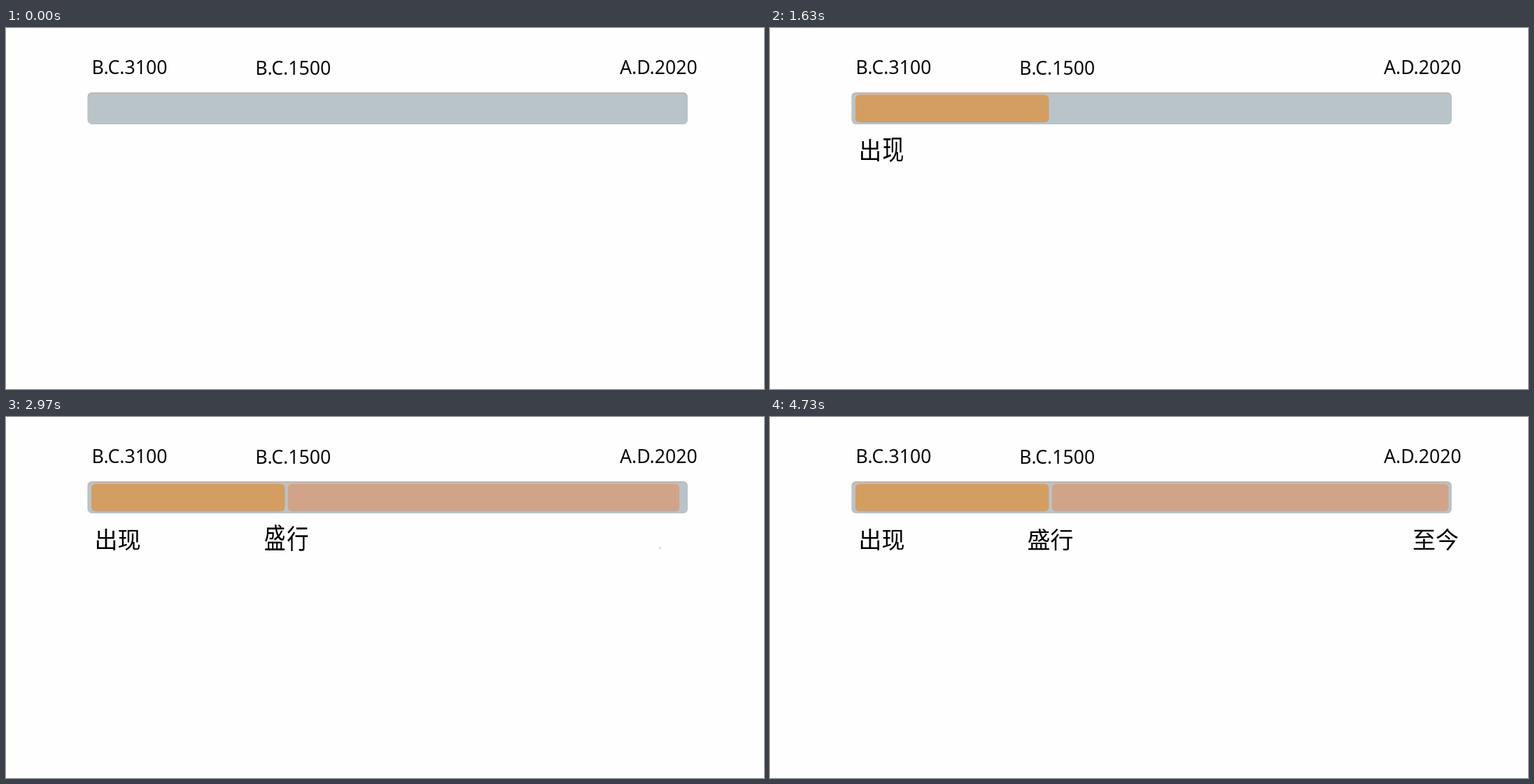
These frames come from a looping animation (1083x517 px, 5.01 s). An HTML page:

```html
<!DOCTYPE html>
<html lang="zh-CN">
<head>
<meta charset="utf-8">
<style>
html, body { margin: 0; width: 100%; height: 100%; overflow: hidden; background: #fefefe; }
svg { display: block; width: 1083px; height: 517px; }
.year { font: 26.7px "Noto Sans", "Open Sans", sans-serif; fill: #0a0a0a; }
.word { font: 33px "Noto Sans CJK SC", "Noto Sans CJK", sans-serif; text-anchor: middle; }
</style>
</head>
<body>
<svg viewBox="0 0 1083 517">
  <text class="year" x="122.5" y="66">B.C.3100</text>
  <text class="year" x="356.3" y="67">B.C.1500</text>
  <text class="year" x="877" y="66">A.D.2020</text>
  <rect x="116.5" y="92.3" width="857.3" height="45" rx="6" fill="#c2ada3"/>
  <rect x="117" y="94" width="857" height="44" rx="6" fill="#b9c4c9"/>
  <g id="stage"></g>
</svg>
<script>
const LOOP = 5010;
const stage = document.getElementById('stage');
const clamp = v => Math.min(1, Math.max(0, v));

// Bars ease in slowly, then rush to full width.
const grow = age => Math.sin(Math.PI / 2 * clamp(age / 1350) ** 2) ** 2;

// Characters grow steadily, lag in height, then overshoot and settle.
function stretch(age) {
  const size = clamp(age / 1120);
  const swing = 0.2 * Math.sin(2 * Math.PI * (clamp((age - 640) / 900) - 0.5));
  return [size - 0.35 * Math.max(0, swing), size + swing];
}

function add(tag, attrs, text = '') {
  const el = document.createElementNS('http://www.w3.org/2000/svg', tag);
  for (const key in attrs) el.setAttribute(key, attrs[key]);
  el.textContent = text;
  return stage.appendChild(el);
}

function addBar(x, width, fill, start) {
  return { x, start, el: add('rect', { y: 95.7, width, height: 39.6, rx: 6, fill }) };
}

function addWord(word, x, start) {
  return [...word].map((char, i) =>
    ({ x: x + 33 * i, start: start + 140 * i, el: add('text', { class: 'word', y: -1 }, char) }));
}

const bars = [addBar(122, 276.5, '#d49d62', 130), addBar(402.7, 566.8, '#d1a489', 1670)];
const chars = [addWord('出现', 143, 120), addWord('盛行', 384, 1630), addWord('至今', 934.5, 2870)].flat();

function place(el, x, y, sx, sy) {
  el.setAttribute('visibility', sx > 0 ? 'visible' : 'hidden');
  el.setAttribute('transform', `translate(${x} ${y}) scale(${sx} ${sy})`);
}

function draw(now) {
  const t = now % LOOP;
  for (const { el, x, start } of bars) place(el, x, 0, grow(t - start), 1);
  for (const { el, x, start } of chars) {
    const age = t - start;
    const tint = clamp(1 - age / 1150);
    place(el, x, 189.4, ...stretch(age));
    el.setAttribute('fill', `rgb(${[212, 160, 130].map(c => Math.round(c * tint))})`);
  }
}

let begin;
function tick(now) {
  begin ??= now;
  draw(now - begin);
  requestAnimationFrame(tick);
}
draw(0);
requestAnimationFrame(tick);
</script>
</body>
</html>
```
